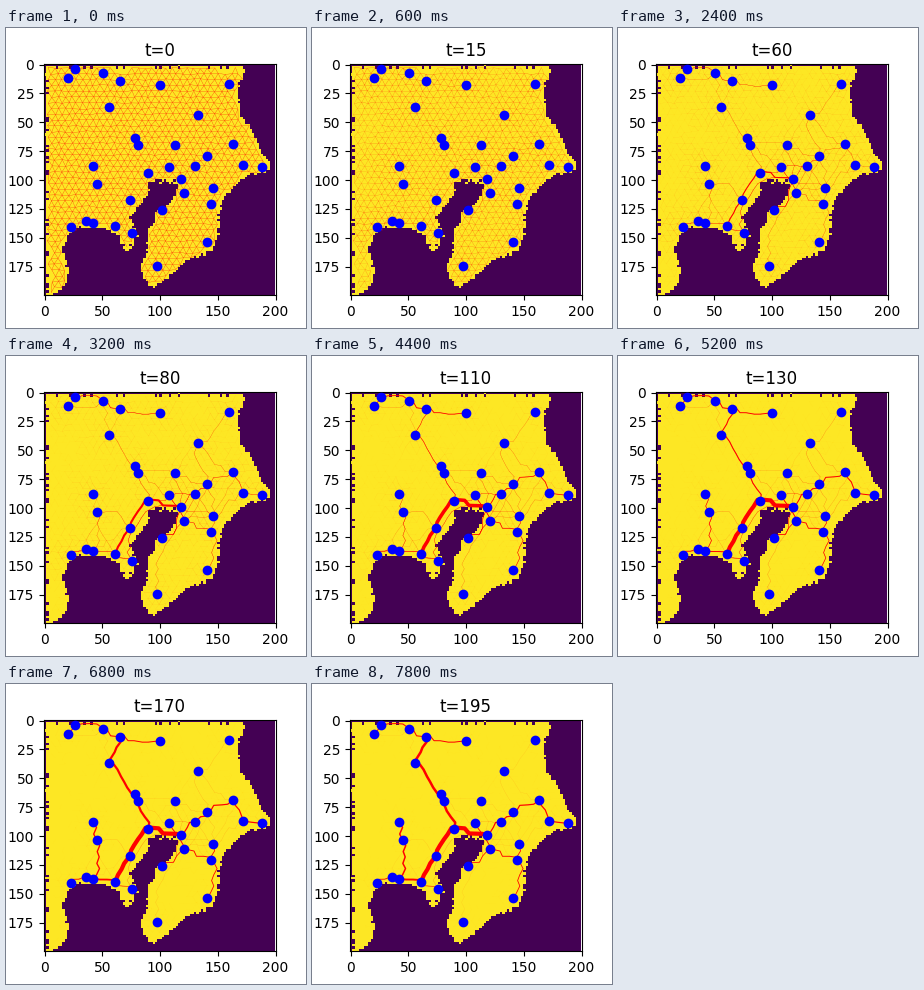
A matplotlib script that plays this animation: 300x300 px, repeating every 8000 ms.

```python
import numpy as np
import matplotlib.pyplot as plt
from matplotlib.animation import FuncAnimation
from matplotlib.path import Path
from matplotlib.collections import LineCollection
from matplotlib.tri import Triangulation

N = 200            # map cells per side
BLOCK = 2          # coastline grain in cells
PX = 0.72          # points per pixel at 100 dpi
STEP = 5           # time units per drawn frame
FRAMES = 40
GROW = 120         # time units a tube takes to reach full width
rng = np.random.default_rng(11)

SHORE = [
    # north edge and east coast
    (2, 2), (172, 2), (173, 7), (167, 22), (170, 45), (180, 57), (188, 77),
    (196, 86), (195, 92), (180, 94), (167, 103), (154, 117), (151, 130),
    (151, 147), (144, 161), (122, 171), (103, 187), (95, 193), (87, 186),
    (83, 174), (88, 167), (89, 148),
    # bay
    (97, 128), (108, 120), (116, 107), (111, 102), (97, 100), (89, 101),
    (91, 110), (82, 122), (73, 132), (81, 147), (72, 162), (68, 160),
    # west coast
    (65, 147), (51, 142), (28, 141), (20, 148), (16, 161), (21, 180),
    (15, 195), (2, 201),
]
CITIES = np.array([
    (26, 4), (20, 12), (51, 7), (65, 14), (100, 18), (160, 17), (56, 37),
    (133, 44), (78, 64), (81, 70), (113, 70), (163, 69), (141, 79), (130, 88),
    (172, 87), (188, 89), (42, 88), (45, 103), (90, 94), (108, 89), (118, 99),
    (121, 111), (146, 107), (144, 121), (102, 126), (74, 117), (36, 135),
    (42, 137), (23, 141), (61, 140), (76, 146), (141, 154), (97, 174),
])
# Cities on each line, time it starts to grow, full width in pixels.
LINES = [
    ([29, 25, 18, 20], 20, 4.2),
    ([1, 0, 2, 3, 4], 25, 1.0),
    ([3, 6, 8, 9, 18], 75, 2.5),
    ([16, 17, 27], 75, 1.5),
    ([28, 26, 27], 20, 0.8),
    ([27, 29], 70, 1.9),
    ([20, 13, 12, 11, 14, 15], 40, 1.2),
    ([19, 20, 21, 23], 25, 0.9),
    ([22, 23, 31], 40, 0.8),
    ([21, 24], 25, 0.7),
    ([29, 30], 0, 0.5),
]


def make_land():
    """Rasterise the coast in coarse blocks with a ragged edge."""
    c = np.arange(0, N, BLOCK) + (BLOCK - 1) / 2
    pts = np.stack(np.meshgrid(c, c), axis=-1).reshape(-1, 2)
    pts += rng.normal(0, 0.7, pts.shape)
    inside = Path(SHORE).contains_points(pts).reshape(len(c), -1)
    return np.kron(inside, np.ones((BLOCK, BLOCK))) > 0


def on_land(pts):
    x, y = np.rint(pts).astype(int).clip(0, N - 1).T
    return land[y, x]


def make_mesh(dx=6, dy=5):
    """Triangular mesh over the land, with the cities as its first nodes."""
    grid = np.array([(x + r % 2 * dx / 2, 3 + r * dy)
                     for r in range(N // dy) for x in range(3, N, dx)], float)
    grid += rng.uniform(-0.7, 0.7, grid.shape)
    gap = np.hypot(*(grid[:, None] - CITIES).transpose(2, 0, 1)).min(axis=1)
    nodes = np.vstack([CITIES, grid[on_land(grid) & (gap > 2.5)]])
    links = Triangulation(*nodes.T).edges
    ends = nodes[links]
    length = np.hypot(*(ends[:, 1] - ends[:, 0]).T)
    at_city = (links < len(CITIES)).any(axis=1)
    keep = (length < 9.5) & (on_land(ends.mean(axis=1)) | at_city)
    return nodes, links[keep], length[keep]


def shortest_tree(start):
    """Dijkstra: the previous node on the cheapest way from start."""
    dist = np.full(len(nodes), np.inf)
    prev = np.full(len(nodes), -1)
    todo = np.ones(len(nodes), bool)
    dist[start] = 0
    for _ in nodes:
        k = np.argmin(np.where(todo, dist, np.inf))
        todo[k] = False
        near = dist[k] + cost[k]
        better = near < dist
        dist[better] = near[better]
        prev[better] = k
    return prev


def route(a, b):
    way = [b]
    while way[-1] != a:
        k = trees[a][way[-1]]
        way.append(a if k < 0 else k)
    return nodes[way]


def ease(u):
    u = np.clip(u, 0, 1)
    return u * u * (3 - 2 * u)


land = make_land()
nodes, links, length = make_mesh()

cost = np.full((len(nodes), len(nodes)), np.inf)
i, j = links.T
cost[i, j] = cost[j, i] = length * rng.uniform(1, 1.2, len(length))
trees = [shortest_tree(k) for k in range(len(CITIES))]

edges = nodes[links]
to_city = edges.mean(axis=1)[:, None] - CITIES
gap = np.hypot(*to_city.transpose(2, 0, 1)).min(axis=1)
decay = (0.018 + 0.0012 * gap) * rng.uniform(0.6, 1.5, len(edges))

# Faint strands join neighbouring cities for a while.
veins = [route(a, b) for a in range(len(CITIES)) for b in range(a)
         if 12 < np.hypot(*(CITIES[a] - CITIES[b])) < 42]
vein_size = rng.uniform(0.04, 0.25, len(veins))

fig, ax = plt.subplots(figsize=(3, 3), dpi=100)
ax.imshow(land, cmap="viridis", vmin=0, vmax=1, interpolation="nearest")
ax.set_xlim(-0.5, N)
ax.set_autoscale_on(False)

mesh_lines = LineCollection(edges, colors="red", zorder=2)
vein_lines = LineCollection(veins, colors="red", zorder=2)
ax.add_collection(mesh_lines)
ax.add_collection(vein_lines)
tubes = []
for stops, start, width in LINES:
    path = np.vstack([route(b, a) for a, b in zip(stops, stops[1:])])
    line, = ax.plot(*path.T, color="red", zorder=3,
                    solid_capstyle="round", solid_joinstyle="round")
    tubes.append((line, start, width))
ax.plot(*CITIES.T, "bo", zorder=4)
title = ax.set_title("t=0")


def draw(frame):
    t = frame * STEP
    title.set_text(f"t={t}")
    mesh_lines.set_linewidths(0.25 * PX * np.exp(-decay * t))
    fade = ease(t / 80) * (1 - 0.8 * ease((t - 80) / 115))
    vein_lines.set_linewidths(vein_size * PX * fade)
    for line, start, width in tubes:
        line.set_linewidth(PX * width * ease((t - start) / GROW))


anim = FuncAnimation(fig, draw, frames=FRAMES, interval=200, repeat=True,
                     repeat_delay=0, blit=False)
plt.show()
```
